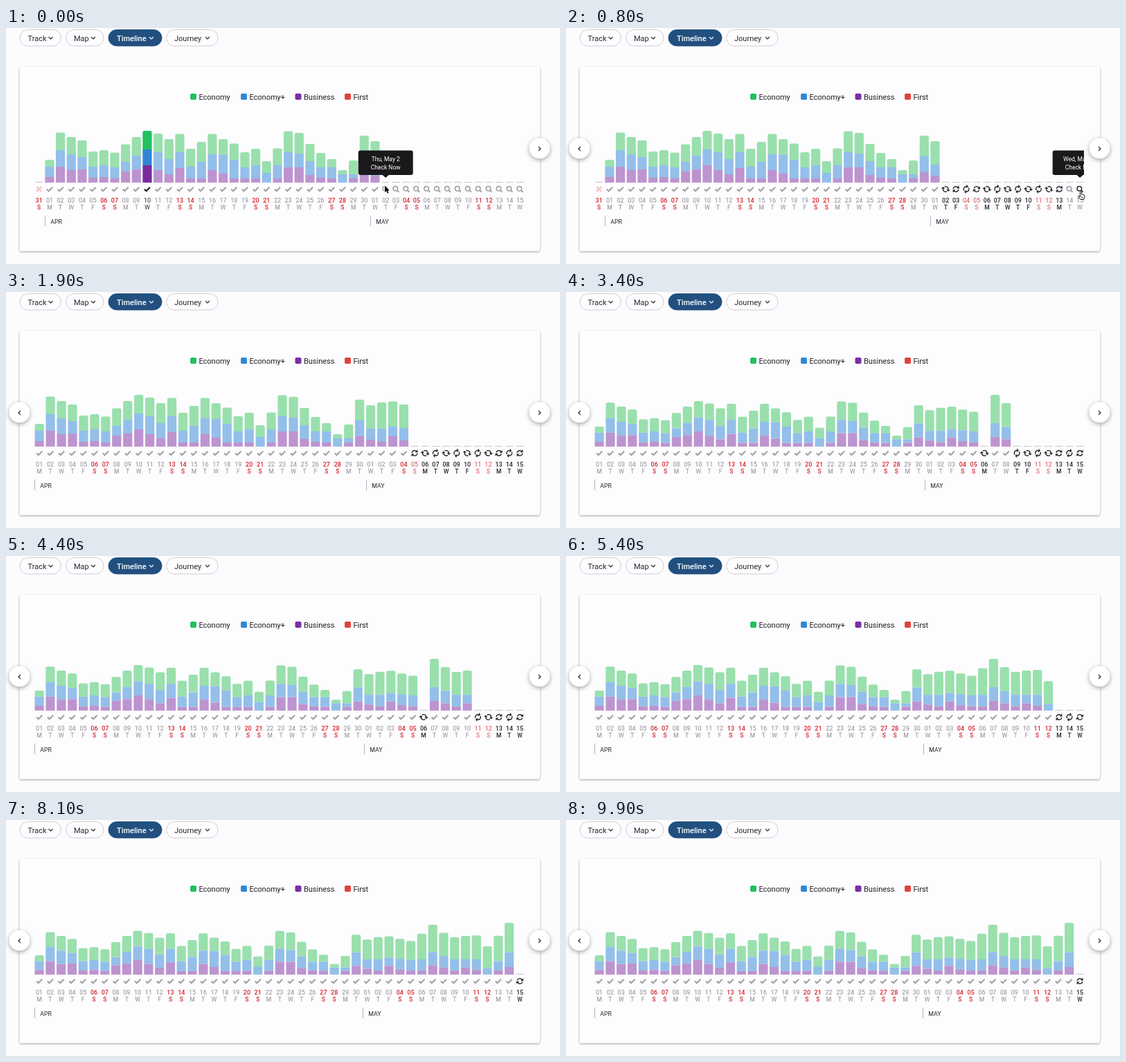
Write an HTML page with a canvas that moves like this. It is 800 by 342 pixels and loops after 10 s.

```html
<!DOCTYPE html>
<html lang="en">
<head>
<meta charset="utf-8">
<title>Seat timeline</title>
<style>
  html, body { margin: 0; width: 100%; height: 100%; overflow: hidden; background: #fcfbfd; }
  canvas { display: block; width: 800px; height: 342px; }
</style>
</head>
<body>
<canvas id="stage"></canvas>
<script>
const canvas = document.getElementById('stage');
const dpr = window.devicePixelRatio || 1;
canvas.width = 800 * dpr;
canvas.height = 342 * dpr;
const ctx = canvas.getContext('2d');

const LOOP = 10000, STEP = 100;
const BASE = 224, FULL = 75;          // bar baseline and tallest bar
const LEFT = 40.2, SPAN = 709.4;      // chart extent
const ICON_Y = 233.5;
const FONT = 'Roboto, "Open Sans", sans-serif';
const GREEN = '#22c15e', BLUE = '#3088d6', PURPLE = '#7a2fa3', RED = '#e2433c';
const PALE = ['#99e0ad', '#93bfea', '#bd94cf'];
const VIVID = ['#22c15e', '#2f86d4', '#7a2a9f'];

// Cumulative heights per day: everything, business and economy+, business
const april = [
  33,23,8, 72.5,47,23, 66,41,18, 61,37,19, 45,23,7, 47,25,8, 43.5,22,6, 55.5,30,16,
  66,39,19, 75,48,25, 71,44,18, 63,34,12, 70.5,44,21, 49,23,6, 59,30,6, 70.5,41,18,
  63,40,13, 56.5,33,6, 44,22,6, 49,25,6, 31,14,0, 49.5,25,6, 74.5,44,22, 72,42,22,
  56,31,11, 43,22,7, 34,22,6, 18,12,0, 32,12,6, 68,38,15
];
const may = [
  60,26,10, 64,26,7, 65.5,29,15, 61,27,9, 57.5,25,7, 70,26,7, 85.2,38.6,16, 71.5,32,12,
  63.6,26,7, 66,26,12, 67,26,8, 48.5,11,0, 66.5,23,7, 88.5,38,13
];
// Arrival time of each day in May; the 15th never arrives
const arrival = [0, 1300, 1500, 1800, 2300, 5100, 2700, 3100, 3800, 4200, 4800, 5400, 5700, 6000, Infinity];
// Turn of each loading icon from the 2nd on: upright, flat or tall
const turns = [2, 0, 1, 0, 2, 1, 2, 1, 2, 1, 2, 0, 1, 0].map(k => [0, -0.7, 0.85][k]);
const SWEEP = 800 / 13;               // pointer time per column

const days = [{ num: 31, month: 'MAR', missing: true }];
function addDays(month, count, data) {
  for (let i = 0; i < count; i++) {
    days.push({ num: i + 1, month, bar: data.slice(i * 3, i * 3 + 3),
                arrive: 0, order: -1 });
  }
}
addDays('APR', 30, april);
addDays('MAY', 15, may);
days.forEach((d, i) => {
  d.letter = 'SMTWTFS'[i % 7];
  d.weekend = d.letter === 'S';
  if (d.month === 'MAY') {
    d.arrive = arrival[d.num - 1];
    d.order = d.num - 2;
  }
});

function text(str, x, y, size, color, weight = 400, align = 'left') {
  ctx.font = `${weight} ${size}px ${FONT}`;
  ctx.textAlign = align;
  ctx.fillStyle = color;
  ctx.fillText(str, x, y);
}

function box(x, y, w, h, r, fill, stroke) {
  ctx.beginPath();
  ctx.roundRect(x, y, w, h, r);
  if (fill) { ctx.fillStyle = fill; ctx.fill(); }
  if (stroke) { ctx.strokeStyle = stroke; ctx.lineWidth = 1; ctx.stroke(); }
}

function line(points, color, width, cap = 'butt') {
  ctx.beginPath();
  points.forEach(([x, y]) => ctx.lineTo(x, y));
  ctx.strokeStyle = color;
  ctx.lineWidth = width;
  ctx.lineCap = cap;
  ctx.lineJoin = 'miter';
  ctx.stroke();
}

function poly(points, fill) {
  ctx.beginPath();
  points.forEach(([x, y]) => ctx.lineTo(x, y));
  ctx.closePath();
  ctx.fillStyle = fill;
  ctx.fill();
}

function shadow(color, blur, dy, draw) {
  ctx.save();
  ctx.shadowColor = color;
  ctx.shadowBlur = blur * dpr;
  ctx.shadowOffsetY = dy * dpr;
  draw();
  ctx.restore();
}

function at(x, y, angle, draw) {
  ctx.save();
  ctx.translate(x, y);
  ctx.rotate(angle);
  draw();
  ctx.restore();
}

function tab(label, x, w, textX, chevronX, active) {
  box(x, 2.5, w, 23.5, 11.75, active ? '#21507f' : '#fdfcfe', active ? '#21507f' : '#cfcdd6');
  const color = active ? '#ffffff' : '#2b2a30';
  text(label, textX, 18.5, 11, color, active ? 500 : 400);
  line([[chevronX - 3, 13], [chevronX, 16], [chevronX + 3, 13]], color, 1.2);
}

function pager(x, dir) {
  shadow('rgba(0,0,0,.35)', 6, 2, () => box(x - 15, 159.5, 30, 30, 15, '#ffffff'));
  line([[x - dir * 1.5, 172], [x + dir * 1.5, 175], [x - dir * 1.5, 178]], '#222', 1.2);
}

function legend(label, x, color) {
  box(x, 95, 9, 9, 2, color);
  text(label, x + 12.4, 103.5, 11, '#1f1e22');
}

function check(x, color) {
  line([[x - 4, 233.6], [x - 1.3, 236.2], [x + 4.1, 230.8]], color, 2.2);
}

function cross(x) {
  line([[x - 3.5, 230], [x + 3.5, 237]], '#f6c4c4', 2.4);
  line([[x + 3.5, 230], [x - 3.5, 237]], '#f6c4c4', 2.4);
}

function lens(x, color) {
  ctx.beginPath();
  ctx.arc(x - 0.8, ICON_Y - 0.8, 3.3, 0, 7);
  ctx.strokeStyle = color;
  ctx.lineWidth = 1.5;
  ctx.stroke();
  line([[x + 1.6, ICON_Y + 1.6], [x + 4.3, ICON_Y + 4.3]], color, 1.8);
}

function sync(x, angle) {
  for (const half of [0, Math.PI]) {
    at(x, ICON_Y, angle + half, () => {
      ctx.beginPath();
      ctx.arc(0, 0, 3.8, Math.PI * 1.06, Math.PI * 1.8);
      ctx.strokeStyle = '#262529';
      ctx.lineWidth = 1.5;
      ctx.stroke();
      poly([[4.8, -4.6], [4.8, -0.7], [0.9, -0.7]], '#262529');
    });
  }
}

function bar(d, x, scale, colors) {
  const tops = d.bar.map(v => BASE - v * scale);
  const ends = [tops[1], tops[2], BASE];
  for (let k = 0; k < 3; k++) {
    const h = ends[k] - tops[k];
    if (h > 0) box(x - 6.6, tops[k], 13.2, h, k ? 0 : [2.5, 2.5, 0, 0], colors[k]);
  }
}

function tooltip(x, d) {
  ctx.save();
  ctx.beginPath();
  ctx.rect(0, 0, 748, 342);
  ctx.clip();
  box(x - 39.5, 177.5, 79, 35.5, 3, '#1a191c');
  poly([[x - 4.5, 213], [x + 4.5, 213], [x, 217]], '#1a191c');
  const names = { M: 'Mon', W: 'Wed', F: 'Fri' };
  const weekday = names[d.letter] || (d.letter === 'T' ? ['Tue', 'Thu'] : ['Sat', 'Sun'])[weekHalf(d)];
  text(`${weekday}, May ${d.num}`, x, 192.5, 8.5, '#fff', 400, 'center');
  text('Check Now', x, 204.5, 8.5, '#fff', 400, 'center');
  ctx.restore();
}

// Tells Tuesday from Thursday and Saturday from Sunday
function weekHalf(d) {
  const day = days.indexOf(d) % 7;
  return day === 4 || day === 0 ? 1 : 0;
}

function arrowCursor(x, y) {
  const shape = [[0, 0], [0, 9.5], [2.2, 7.6], [3.8, 11], [5.6, 10.2], [4, 6.9], [6.8, 6.7]];
  at(x, y, 0, () => {
    line([...shape, shape[0]], '#fff', 1.6);
    poly(shape, '#000');
  });
}

function handCursor(x, y) {
  at(x, y, 0, () => {
    ctx.beginPath();
    ctx.moveTo(-1.6, 2);
    ctx.lineTo(-1.6, -5);
    ctx.quadraticCurveTo(-0.6, -7, 0.4, -5);
    ctx.lineTo(0.4, -1.5);
    ctx.lineTo(4, -0.6);
    ctx.quadraticCurveTo(5.2, 0, 5, 2);
    ctx.lineTo(3.8, 6);
    ctx.lineTo(-1.2, 6);
    ctx.lineTo(-4.6, 1.4);
    ctx.quadraticCurveTo(-4.4, -0.2, -1.6, 2);
    ctx.closePath();
    ctx.fillStyle = '#fff';
    ctx.fill();
    ctx.strokeStyle = '#111';
    ctx.lineWidth = 1;
    ctx.stroke();
    for (const fx of [0.4, 2.2]) line([[fx, 1.6], [fx, 4.2]], '#111', 0.7);
  });
}

function chart(t) {
  const shown = t < 1100 ? days : days.slice(1);
  const loaded = d => !d.missing && t >= d.arrive;
  const waiting = shown.filter(d => !loaded(d)).length;
  const wide = (SPAN + waiting * 0.75) / shown.length;
  const scale = FULL / Math.max(...shown.filter(loaded).map(d => d.bar[0]));
  const hovered = t < 1000 ? Math.min(13, Math.round(t / SWEEP)) : -1;
  let edge = LEFT, hover = null;

  for (const d of shown) {
    const w = loaded(d) ? wide : wide - 0.75;
    const x = edge + w / 2;
    edge += w;
    const picked = t < 100 && d.month === 'APR' && d.num === 10;
    const spinning = d.order >= 0 && !loaded(d) && t >= d.order * SWEEP + 100;
    let color = d.weekend ? '#d4242a' : '#8d8b90', weight = d.weekend ? 500 : 400;

    if (loaded(d)) {
      bar(d, x, scale, picked ? VIVID : PALE);
      check(x, picked ? '#222' : '#a3a1a5');
      if (picked) color = '#2b2a2e';
    } else {
      line([[x - 5.5, 223.5], [x + 5.5, 223.5]], '#c9c7cc', 1);
      if (d.missing) cross(x);
      else if (spinning) {
        const jitter = 0.13 * Math.sin(t * 0.037 + d.num * 1.9);
        sync(x, turns[d.order] + jitter);
        if (d.weekend) { color = '#dc4a4c'; weight = 400; }
        else { color = '#262529'; weight = 500; }
      } else lens(x, d.order === hovered && t > 0 ? '#262529' : '#9c9a9f');
    }
    if (d.order >= 0 && d.order === hovered) hover = { x, d };

    const label = String(d.num).padStart(2, '0');
    text(label, x, 252.7, 9, color, weight, 'center');
    text(d.letter, x, 263.2, 8.5, color, weight, 'center');
    if (d.num === 1) {
      const mark = Math.floor(x - 6.4) + 0.5;
      line([[mark, 272], [mark, 287.5]], '#b5b3b8', 1);
      text(d.month, mark + 7.7, 283.5, 8.8, '#2b2a2e');
    }
  }
  return hover;
}

function draw(t) {
  ctx.setTransform(dpr, 0, 0, dpr, 0, 0);
  ctx.fillStyle = '#fcfbfd';
  ctx.fillRect(0, 0, 800, 342);

  tab('Track', 20, 59.5, 31.5, 64.5);
  tab('Map', 86.5, 54.5, 98, 126);
  tab('Timeline', 148, 77, 160, 210, true);
  tab('Journey', 231.5, 74.5, 243, 291);

  shadow('rgba(0,0,0,.38)', 3, 1, () => box(19.5, 56, 751.5, 267.5, 3, '#fdfcfe'));
  legend('Economy', 266, GREEN);
  legend('Economy+', 339, BLUE);
  legend('Business', 417.5, PURPLE);
  legend('First', 489, RED);

  const hover = chart(t);
  if (t >= 100) pager(19.5, -1);
  pager(770.5, 1);
  if (hover) {
    tooltip(hover.x, hover.d);
    if (t < 100) arrowCursor(547, 228.5);
    else handCursor(548 + Math.min(1, t / 800) * 196, 229 + Math.min(1, t / 800) * 13.5);
  }
}

const start = performance.now();
function frame() {
  const t = (performance.now() - start) % LOOP;
  draw(Math.floor(t / STEP) * STEP);
  requestAnimationFrame(frame);
}
frame();
</script>
</body>
</html>
```
